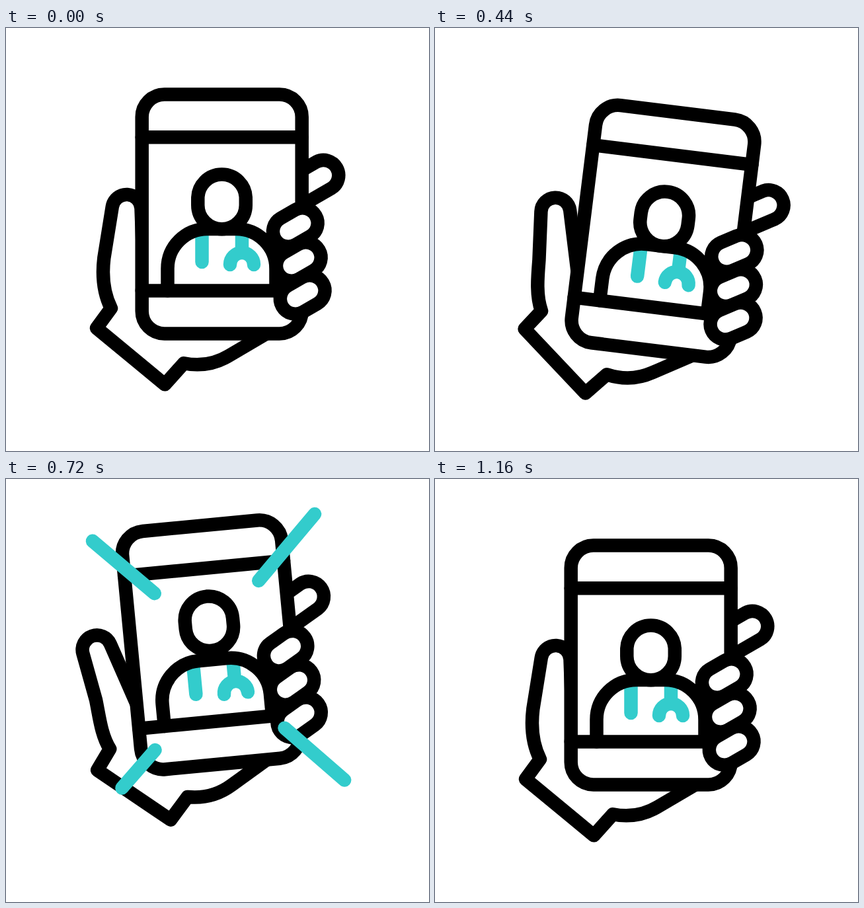
Animation of 640 by 640 pixels, one loop 1.44 s. Source, as an HTML page:

```html
<!DOCTYPE html>
<html lang="en">
<head>
<meta charset="utf-8">
<title>Hand with phone</title>
<style>
  html, body { margin: 0; width: 100%; height: 100%; overflow: hidden; background: #fff; }
  svg { display: block; width: 100vw; height: 100vh; }
  .ink, .teal { stroke-width: 20.5; stroke-linecap: round; stroke-linejoin: round; }
  .ink { stroke: #000; fill: #fff; }
  .teal { stroke: #33cccc; fill: none; }
  .line { fill: none; }
</style>
</head>
<body>
<svg viewBox="0 0 640 640">
  <g id="figure">
    <g class="ink">
      <path id="hand"/>
      <path d="M447 215.6 L469.5 202.6 A23 23 0 0 1 492.5 242.4 L447 268.7"/>
      <rect x="205.7" y="100.6" width="242" height="361.9" rx="34"/>
    </g>
    <path class="teal" d="M296.5 306 V354 M357 306 V340 M339 358 A18 18 0 0 1 375 358"/>
    <g class="ink line">
      <path d="M244.5 397.5 V364 A60 60 0 0 1 304.5 304 H348.5 A60 60 0 0 1 408.5 364 V397.5"/>
      <path d="M205.7 165.3 H447.7 M205.7 397.5 H447.7"/>
    </g>
    <rect id="head" class="ink" x="290.3" y="221.6" width="72.5" height="82.6" rx="36.2"/>
    <g id="fingers" class="ink"></g>
    <g id="sparks" class="teal"></g>
  </g>
</svg>
<script>
const LOOP = 1440, STEP = 40;
const NS = "http://www.w3.org/2000/svg";
const PIVOT = [137, 442];
const byId = id => document.getElementById(id);

// Tracks of [time, value], eased in and out between keys.
const TRACKS = {
  turn: [[180, 0], [430, 7.1], [830, -8.3], [1120, 0]],
  dy: [[80, 0], [310, 9.1], [660, -16], [930, 4.3], [1160, 0]],
  thumb: [[240, 0], [560, 1], [680, 1], [970, 0]],
  hop: [[600, 0], [840, -27.3], [1160, 0]]
};

// Sparks: inner point, outer point, keys of the leading and trailing end.
const SPARKS = [
  { from: [253, 200.5], to: [152.3, 97.5], lead: [560, 760], trail: [680, 1000] },
  { from: [402.5, 196.5], to: [512.7, 88.2], lead: [560, 760], trail: [680, 1000] },
  { from: [421, 413], to: [518, 515], lead: [560, 760], trail: [680, 1000] },
  { from: [244.2, 415.7], to: [143, 511.5], lead: [590, 790], trail: [640, 945] }
];

function ease(a, b, t) {
  const u = Math.min(1, Math.max(0, (t - a) / (b - a)));
  return u * u * (3 - 2 * u);
}

function sample(keys, t) {
  let value = keys[0][1];
  for (let i = 1; i < keys.length; i++) {
    value += (keys[i][1] - keys[i - 1][1]) * ease(keys[i - 1][0], keys[i][0], t);
  }
  return value;
}

function add(parent, tag, attrs) {
  const el = document.createElementNS(NS, tag);
  for (const name in attrs) el.setAttribute(name, attrs[name]);
  return parent.appendChild(el);
}

// Point where the line from p touches the circle; side picks one of the two.
function tangent(c, r, p, side) {
  const x = p[0] - c[0], y = p[1] - c[1];
  const a = Math.atan2(y, x) + side * Math.acos(r / Math.hypot(x, y));
  return [c[0] + r * Math.cos(a), c[1] + r * Math.sin(a)];
}

function handPath(open) {
  const tip = [182.5 - 30.3 * open, 274 - 1.4 * open], r = 22;
  const left = [148.3 - 3.5 * open, 348], right = [208, 367];
  return `M${right} L${tangent(tip, r, right, -1)} A${r} ${r} 0 0 0 ${tangent(tip, r, left, 1)}
    L${left} C${145 + 3 * open} 375 148 402 159 424 L137 454 L240.3 539.3 L269 507.3
    C293 512 317 508 337 496 L400 459`;
}

for (const [x, y] of [[437.8, 301.5], [442.8, 353.5], [448.7, 403.5]]) {
  add(byId("fingers"), "rect", {
    x: x - 35.5, y: y - 23, width: 71, height: 46, rx: 23,
    transform: `rotate(-30 ${x} ${y})`
  });
}
for (const s of SPARKS) s.el = add(byId("sparks"), "path", {});

function drawSpark(s, t) {
  const at = u => s.from.map((v, i) => v + (s.to[i] - v) * u);
  const a = at(ease(...s.trail, t)), b = at(ease(...s.lead, t));
  s.el.setAttribute("d", `M${a} L${b[0] + 0.01} ${b[1]}`);
  s.el.style.display = t > 570 && t < 1040 ? "" : "none";
}

function draw(t) {
  const pose = {};
  for (const name in TRACKS) pose[name] = sample(TRACKS[name], t);
  byId("figure").setAttribute("transform",
    `translate(0 ${pose.dy}) rotate(${pose.turn} ${PIVOT})`);
  byId("hand").setAttribute("d", handPath(pose.thumb));
  byId("head").setAttribute("transform", `translate(0 ${pose.hop})`);
  for (const s of SPARKS) drawSpark(s, t);
}

const start = performance.now();
function tick() {
  const t = (performance.now() - start) % LOOP;
  draw(Math.floor(t / STEP) * STEP);
  requestAnimationFrame(tick);
}
tick();
</script>
</body>
</html>
```
